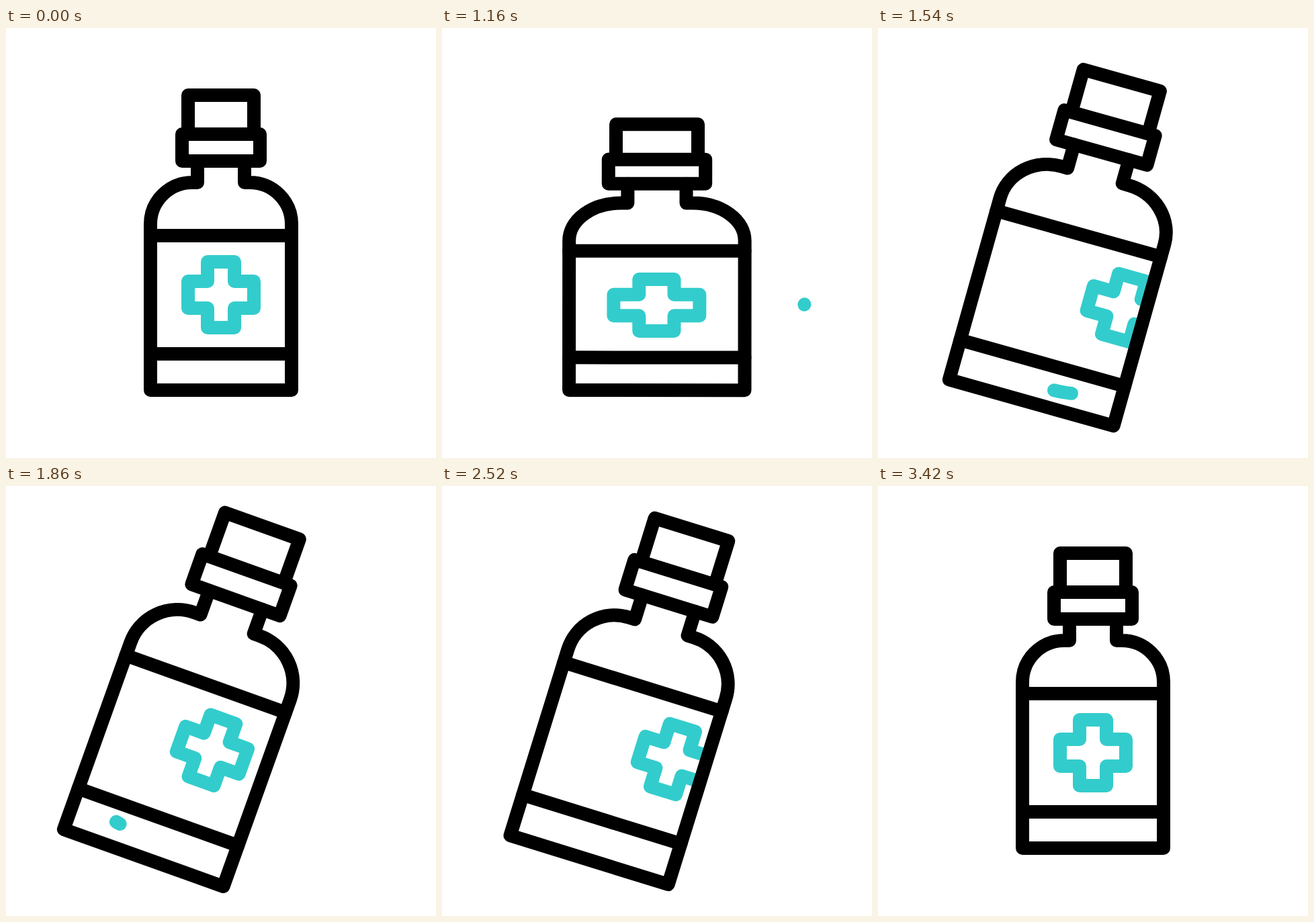
An HTML page that plays this animation: 640 px wide and 640 px high, repeating every 3600 ms.

```html
<!DOCTYPE html>
<html lang="en">
<head>
<meta charset="utf-8">
<title>Medicine bottle</title>
<style>
  html, body { margin: 0; width: 100%; height: 100%; overflow: hidden; background: #fff; }
  svg { display: block; width: 100vw; height: 100vh; }
  path { fill: none; stroke: #000; stroke-width: 20; stroke-linejoin: round; stroke-linecap: round;
         vector-effect: non-scaling-stroke; }
  .teal { stroke: #3cc; }
</style>
</head>
<body>
<svg viewBox="0 0 640 640">
  <defs>
    <!-- bottle coordinates start at the middle of the base -->
    <clipPath id="label"><path id="labelShape" d="M-105 -230H105V-54H-105Z"/></clipPath>
    <path id="cross" class="teal"
      d="M-20 -49H20V-20H49V20H20V49H-20V20H-49V-20H-20Z"/>
  </defs>
  <g id="bottle">
    <g clip-path="url(#label)">
      <use href="#cross" class="slide"/>
      <use href="#cross" class="slide"/>
    </g>
    <g id="outline">
      <path d="M-35 -341V-309H-43A62 62 0 0 0 -105 -247V0H105V-247A62 62 0 0 0 43 -309H35V-341"/>
      <path d="M-58 -381H58V-341H-58Z M-49 -381V-439H49V-381"/>
      <path d="M-105 -230H105M-105 -54H105"/>
    </g>
  </g>
  <path id="swoosh" class="teal" pathLength="1"
    d="M540 410C510 480 400 563 275 542C235 535 185 513 152 493"/>
</svg>
<script>
const LOOP = 3600;
const SPACING = 298.5;
const bottle = document.getElementById('bottle');
const outline = document.getElementById('outline');
const labelShape = document.getElementById('labelShape');
const slides = document.querySelectorAll('.slide');
const swoosh = document.getElementById('swoosh');

// Eased progress from start to end: cubic-bezier(a, 0, b, 1)
function ease(t, start, end, a, b) {
  const x = (t - start) / (end - start);
  if (x <= 0) return 0;
  if (x >= 1) return 1;
  let lo = 0, hi = 1;
  for (let i = 0; i < 30; i++) {
    const u = (lo + hi) / 2, v = 1 - u;
    if (3 * u * v * v * a + 3 * u * u * v * b + u * u * u < x) lo = u; else hi = u;
  }
  return lo * lo * (3 - 2 * lo);
}

function draw(t) {
  const tilt = t < 2200 ? ease(t, 1125, 2060, .55, 0) : 1 - ease(t, 2210, 3400, .6, 0);
  const squash = t < 2200 ? ease(t, 820, 1120, .6, .3) * (1 - tilt) : 0;

  const x = 320 - 117.5 * tilt;
  const y = 539 + 60 * tilt - 46 * tilt * tilt;
  bottle.setAttribute('transform', `translate(${x} ${y}) rotate(${20.05 * tilt})`);

  const scale = `scale(${1 + .201 * tilt + .245 * squash} ${1 + .201 * tilt - .099 * squash})`;
  outline.setAttribute('transform', scale);
  labelShape.setAttribute('transform', scale);

  // The print scrolls around the bottle, so a second copy follows
  const crossY = -142 - 44.5 * tilt + 15.5 * squash;
  slides.forEach((cross, i) => {
    const crossX = -261 * tilt + i * SPACING;
    cross.setAttribute('transform',
      `translate(${crossX} ${crossY}) scale(${1 + .306 * squash} ${1 - .214 * squash})`);
  });

  const head = ease(t, 1100, 2136, .6, 0);
  const tail = ease(t, 1100, 2206, .6, 0);
  swoosh.style.display = head > 0 && tail < 1 ? '' : 'none';
  swoosh.setAttribute('stroke-dasharray', `${Math.max(head - tail, .001)} 2`);
  swoosh.setAttribute('stroke-dashoffset', -Math.min(tail, .998));
}

const begin = performance.now();
function tick() {
  draw((performance.now() - begin) % LOOP);
  requestAnimationFrame(tick);
}
draw(0);
requestAnimationFrame(tick);
</script>
</body>
</html>
```
